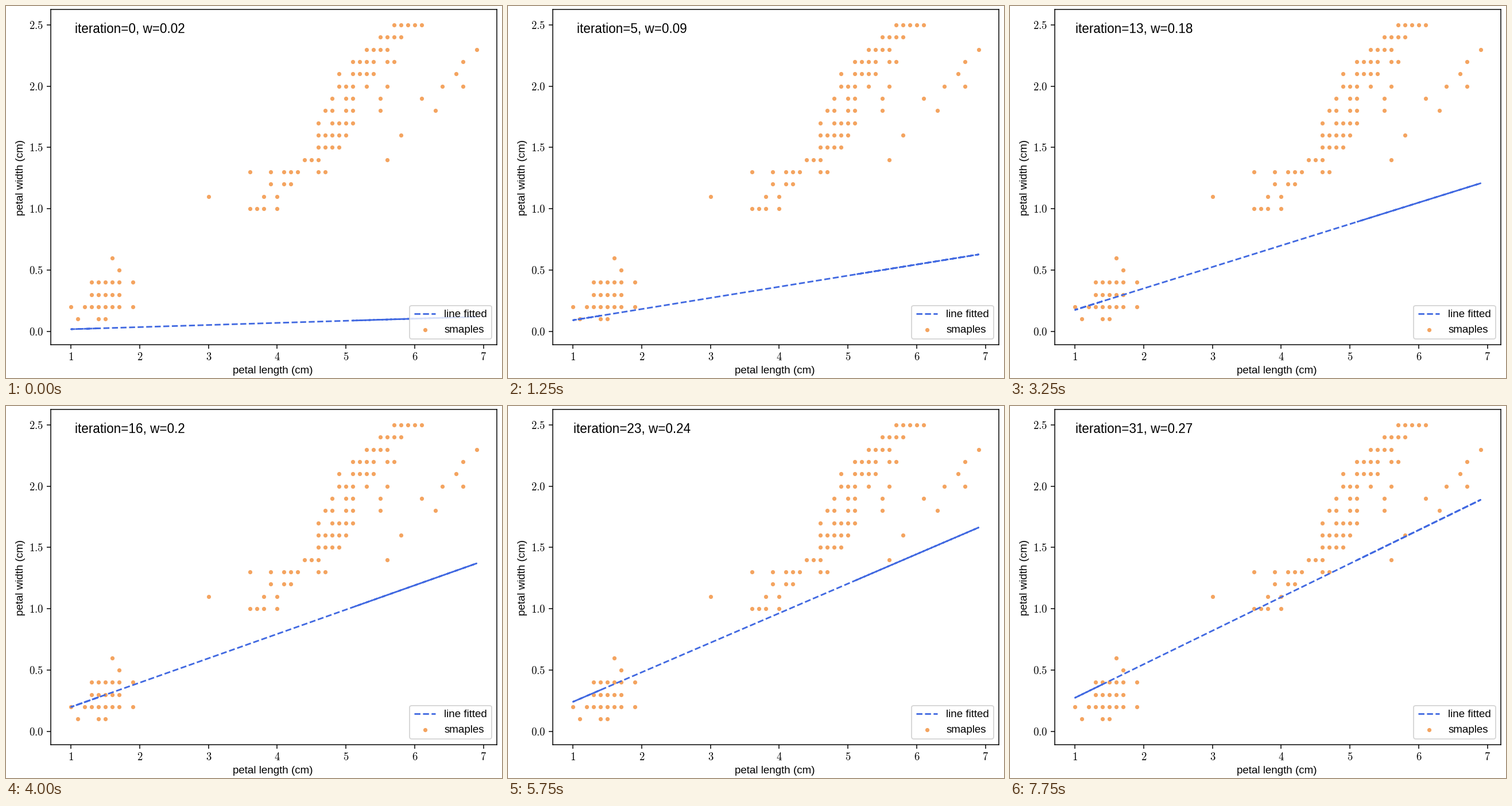
Recreate the animation shown at these times as a matplotlib script. Size 864 px wide and 648 px high, loop 8 s.

```python
import numpy as np
import matplotlib.pyplot as plt
from matplotlib.animation import FuncAnimation

W, H, DPI = 864, 648, 135
STEPS, STEP_MS = 32, 250
SLOPE, DECAY = 0.3365, 0.9489  # least-squares slope, error kept per iteration

plt.rcParams.update({
    "font.family": "Liberation Sans",
    "font.size": 10,
    "mathtext.fontset": "cm",
})


def small_cluster():
    """Compact block of short petals, in millimetres."""
    return {(x, y) for x in range(13, 18) for y in range(2, 5)}


def large_cluster(rng):
    """Rising band on the millimetre grid, densest along its middle."""
    x, y = np.meshgrid(np.arange(33, 62), np.arange(10, 26))
    middle = np.interp(y, [10, 13, 15, 20, 23, 25], [37, 43, 48, 51, 55, 59])
    chance = 0.9 * np.exp(-((x - middle) / 3) ** 2)
    keep = rng.random(x.shape) < chance
    return set(zip(x[keep], y[keep]))


def outliers():
    low = {(10, 2), (12, 2), (19, 2), (19, 4), (11, 1), (14, 1), (15, 1), (17, 5), (16, 6)}
    high = {(30, 11), (36, 13), (56, 14), (58, 16), (63, 18), (61, 19),
            (64, 20), (67, 20), (66, 21), (67, 22), (69, 23)}
    return low | high


def weight(step):
    return SLOPE * (1 - DECAY ** (step + 1))


def padded(low, high):
    margin = 0.05 * (high - low)
    return low - margin, high + margin


def label(x, y, text, **style):
    return fig.text(x / W, 1 - y / H, text, ha="center", va="baseline",
                    rotation_mode="anchor", **style)


points = np.array(sorted(small_cluster() | large_cluster(np.random.default_rng(4))
                         | outliers())) / 10

# The line doubles back at both ends, so its dashes overlap there.
line_x = np.array([1.4, 1.0, 6.9, 5.1])

fig = plt.figure(figsize=(W / DPI, H / DPI), dpi=DPI, facecolor="white")
left, right, top, bottom = 78, 855, 6.4, 589.5
ax = fig.add_axes([left / W, 1 - bottom / H, (right - left) / W, (bottom - top) / H])
ax.set_xlim(*padded(1.0, 6.9))
ax.set_ylim(*padded(weight(0), 2.5))
ax.set_xticks(range(1, 8))
ax.set_yticks(np.arange(0, 2.6, 0.5))
ax.xaxis.set_major_formatter("${x:.0f}$")
ax.yaxis.set_major_formatter("${x:.1f}$")

line, = ax.plot(line_x, weight(0) * line_x, "--", color="royalblue", label="line fitted")
ax.scatter(*points.T, s=8, color="sandybrown", label="smaples")
ax.legend(loc="lower right")

label(465, 640, "petal length (cm)")
label(29.7, 298.5, "petal width (cm)", rotation=90)
status = label(216, 47.5, "", fontsize=12)


def update(step):
    w = weight(step)
    line.set_ydata(w * line_x)
    status.set_text(f"iteration={step}, w={round(w, 2)}")
    return line, status


anim = FuncAnimation(fig, update, frames=STEPS, interval=STEP_MS, repeat=True, repeat_delay=0)
plt.show()
```
